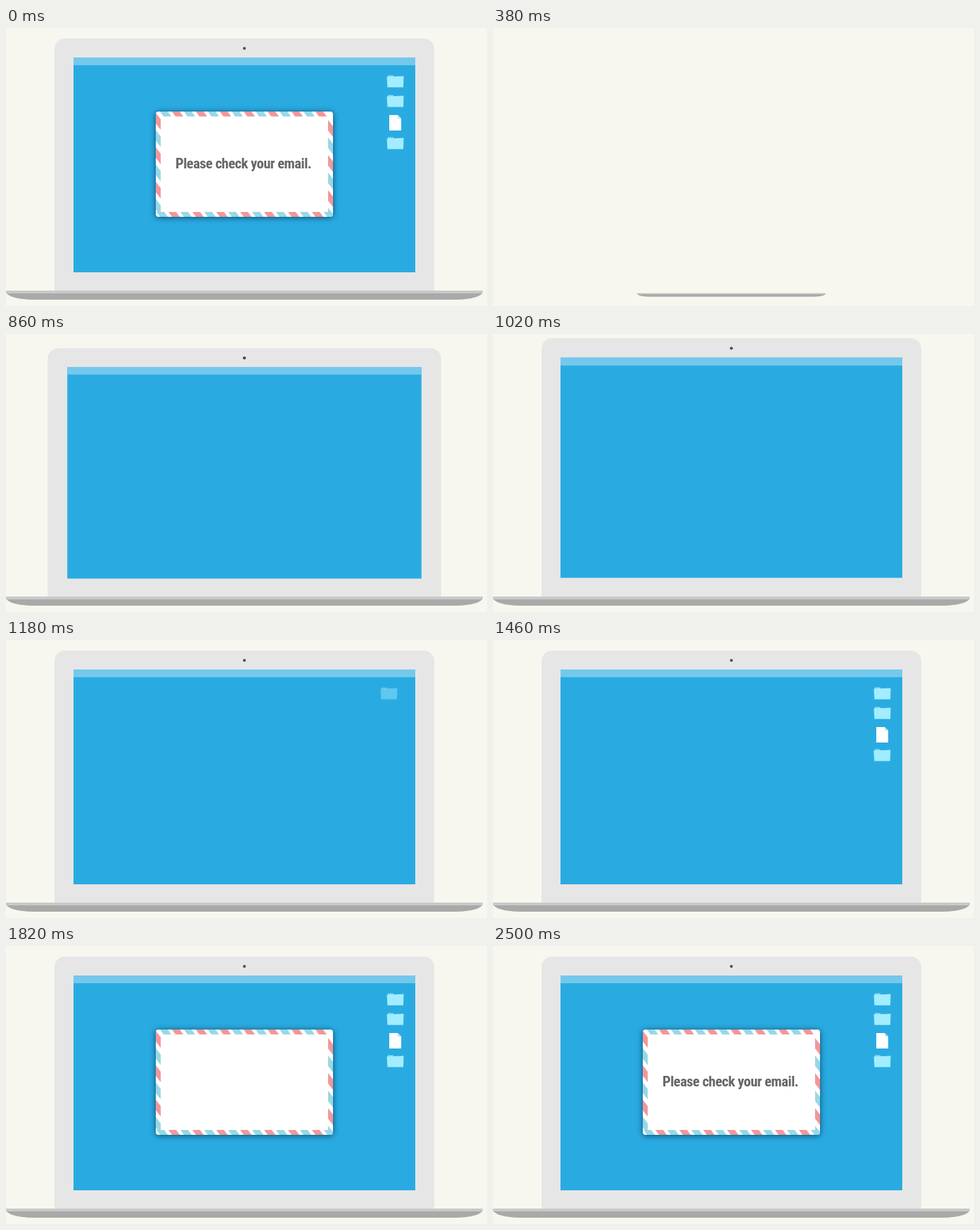
These frames come from a looping animation (684 by 396 pixels, 3700 ms). An HTML page with a canvas:

```html
<!DOCTYPE html>
<html lang="en">
<head>
<meta charset="utf-8">
<title>Please check your email</title>
<style>
  html, body { margin: 0; width: 100%; height: 100%; overflow: hidden; background: #f7f7ef; }
  canvas { display: block; }
</style>
</head>
<body>
<canvas id="stage" width="684" height="396"></canvas>
<script>
const ctx = document.getElementById('stage').getContext('2d');
const LOOP = 3700, STEP = 40, CX = 339;
const CORAL = '#f2979a', AQUA = '#98d8e6';
const MESSAGE = 'Please check your email.';

const progress = (t, from, to) => Math.min(1, Math.max(0, (t - from) / (to - from)));
const mix = (a, b, k) => a + (b - a) * k;
const easeOut = u => 1 - (1 - u) ** 2;
const easeInOut = u => u * u * (3 - 2 * u);

function rect(color, x, y, w, h) {
  ctx.fillStyle = color;
  ctx.fillRect(x, y, w, h);
}

function poly(color, ...pts) {
  ctx.fillStyle = color;
  ctx.beginPath();
  for (let i = 0; i < pts.length; i += 2) ctx.lineTo(pts[i], pts[i + 1]);
  ctx.fill();
}

function rounded(color, x, y, w, h, r) {
  ctx.fillStyle = color;
  ctx.beginPath();
  ctx.roundRect(x, y, w, h, r);
  ctx.fill();
}

// Runs paint() scaled and turned about a pivot, in stage coordinates.
function about(x, y, sx, sy, turn, paint) {
  ctx.save();
  ctx.translate(x, y);
  ctx.rotate(turn);
  ctx.scale(sx, sy);
  ctx.translate(-x, -y);
  paint();
  ctx.restore();
}

function base() {
  ctx.fillStyle = '#a9a9a9';
  ctx.beginPath();
  ctx.moveTo(0, 377);
  ctx.lineTo(678, 377);
  ctx.quadraticCurveTo(672, 386, 640, 387);
  ctx.lineTo(38, 387);
  ctx.quadraticCurveTo(6, 386, 0, 377);
  ctx.fill();
  rect('#c9c9c9', 0, 374, 678, 4);
}

function lid() {
  rounded('#e6e6e6', 69, 15, 540, 359, [15, 15, 0, 0]);
  rect('#29abe2', 96, 42, 486, 306);
  rect('#74c8ec', 96, 42, 486, 11);
  ctx.fillStyle = '#4d4d4d';
  ctx.beginPath();
  ctx.arc(CX, 29, 2.1, 0, 7);
  ctx.fill();
}

function folder(y) {
  rect('#83dcf5', 543, y, 8, 3);
  poly('#a2edff', 541.5, y + 2, 565.5, y + 1, 565, y + 17, 542.5, y + 17);
}

function sheet(y) {
  poly('#fff', 545, y, 557, y, 562, y + 5, 562, y + 22, 545, y + 22);
  poly('#c4e4ef', 557, y, 562, y + 5, 557, y + 5);
}

const icons = [[folder, 67.5], [folder, 95.5], [sheet, 124], [folder, 155.5]];

function desktop(t) {
  icons.forEach(([paint, y], i) => {
    const start = 1140 + 60 * i;
    const k = easeOut(progress(t, start, start + 160));
    ctx.save();
    ctx.globalAlpha = k;
    ctx.translate(-16 * (1 - k), 0);
    paint(y);
    ctx.restore();
  });
}

function card() {
  ctx.save();
  ctx.shadowColor = 'rgba(0, 30, 50, .7)';
  ctx.shadowBlur = 9;
  ctx.shadowOffsetY = 1;
  rounded('#fff', 213, 119, 252, 150, 4);
  ctx.restore();

  ctx.save();
  ctx.beginPath();
  ctx.roundRect(213, 119, 252, 150, 4);
  ctx.clip();
  const across = (x, y, color) => poly(color, x, y, x + 11, y, x + 16, y + 7, x + 5, y + 7);
  const down = (x, y, color) => poly(color, x, y, x + 7, y + 9, x + 7, y + 24, x, y + 15);
  for (let i = 0; i < 15; i++) {
    const color = i % 2 ? CORAL : AQUA;
    if (i < 14) across(219 + 17 * i, 119, color);
    across(214 + 17 * i, 262, color);
  }
  for (let i = 0; i < 6; i++) {
    const color = i % 2 ? AQUA : CORAL;
    down(213, 121 + 24.5 * i, color);
    down(458, 131 + 25 * i, color);
  }
  ctx.restore();
}

function message(count) {
  let size = 25.5;
  ctx.fillStyle = '#666';
  ctx.letterSpacing = '-0.5px';
  do {
    size -= 0.5;
    ctx.font = `bold condensed ${size}px "Roboto Condensed", "Open Sans Condensed", "Open Sans", Roboto, sans-serif`;
  } while (size > 12 && ctx.measureText(MESSAGE).width > 196);
  ctx.fillText(MESSAGE.slice(0, count), 241, 193 + size * 0.355);
}

function draw(t) {
  rect('#f7f7ef', 0, 0, 684, 396);
  if (t < 380) return;

  const grow = t < 540
    ? 1.1 * easeOut(progress(t, 340, 540))
    : mix(1.1, 1, easeInOut(progress(t, 540, 660)));

  if (t >= 740) {
    const width = mix(662, 540, easeOut(progress(t, 740, 940)));
    const height = t < 900
      ? mix(3, 377, easeOut(progress(t, 740, 900)))
      : mix(377, 359, easeInOut(progress(t, 900, 1140)));
    about(CX, 374, width / 540, height / 359, 0, lid);
  }
  about(CX, 380, grow, grow, 0, base);
  desktop(t);

  if (t > 1500) {
    const k = progress(t, 1500, 1740);
    const scale = k < 1 ? 1.1 * k : mix(1.1, 1, progress(t, 1740, 1820));
    about(CX, 194, scale, scale, -20 * (1 - k) * Math.PI / 180, card);
  }
  message(Math.round(MESSAGE.length * progress(t, 1980, 2500)));
}

const began = performance.now();
function tick() {
  const t = (performance.now() - began) % LOOP;
  const held = 20 + Math.floor((t - 20) / STEP) * STEP;
  draw(held < 100 ? LOOP : held);
  requestAnimationFrame(tick);
}
tick();
</script>
</body>
</html>
```
